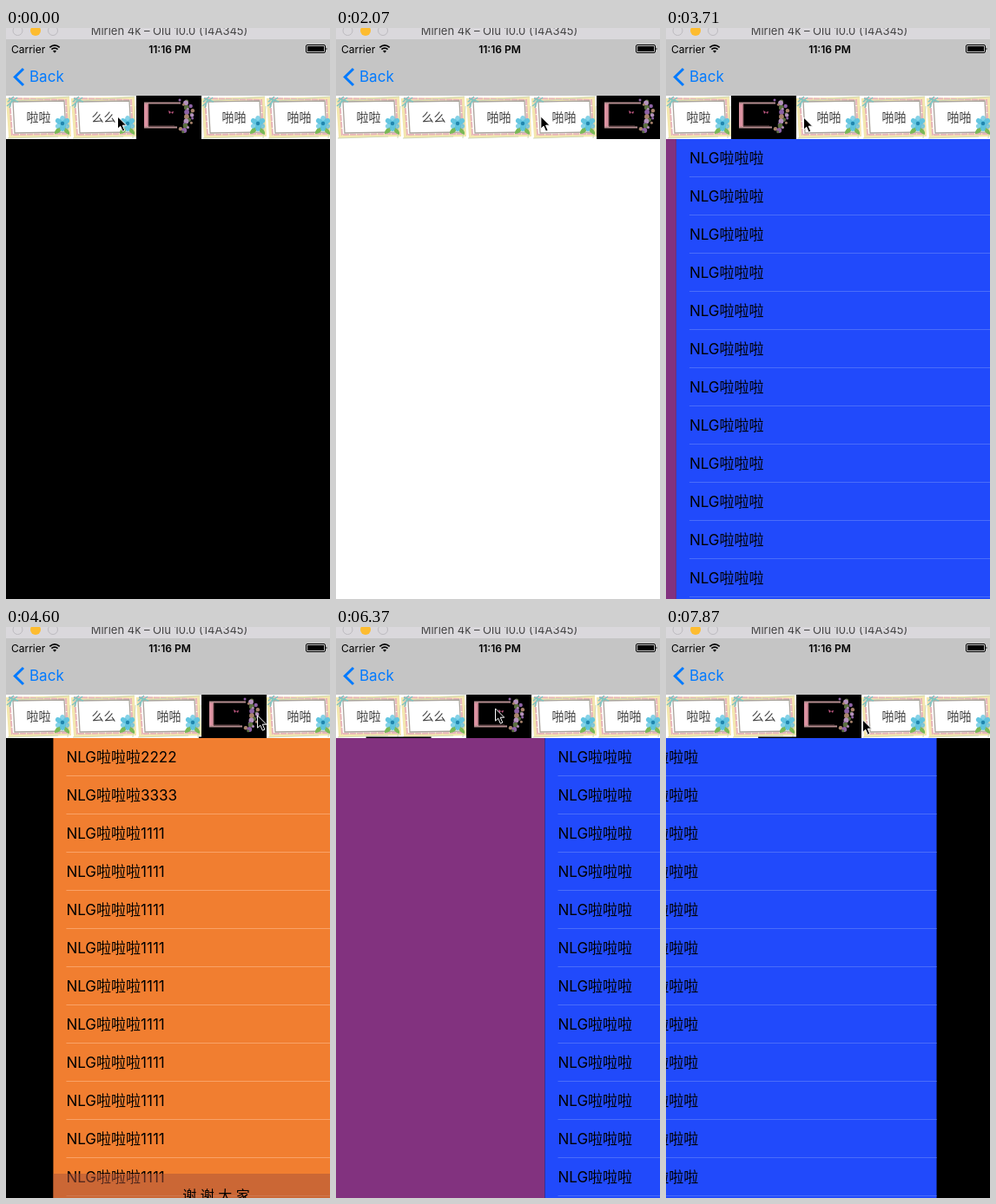
These frames come from a looping animation (373 by 658 pixels, 8 s). An HTML page:

```html
<!DOCTYPE html>
<html lang="zh">
<head>
<meta charset="utf-8">
<style>
  html, body { margin: 0; width: 100%; height: 100%; overflow: hidden; background: #000; }
  svg { display: block; width: 373px; height: 658px; font: 17px Inter, "Noto Sans CJK SC", "Noto Sans CJK", sans-serif; }
  .label { font-size: 14px; fill: #3c3c3c; text-anchor: middle; }
  .mid { text-anchor: middle; }
</style>
</head>
<body>
<svg viewBox="0 0 373 658">
  <defs>
    <g id="light">
      <rect width="75" height="50" fill="#fff"/>
      <g fill="none">
        <path d="M2 5 71 3 73 45 5 47Z" stroke="#f3e7ae" stroke-width="4"/>
        <path d="M4 3 69 5 71 44 7 45Z" stroke="#e8b4b9" stroke-width="2" stroke-dasharray="7 1"/>
        <path d="M1 7 73 1M74 12 71 49M2 49 60 47" stroke="#cfd8b4"/>
        <path d="M8 7 67 6 69 42 10 43Z" fill="#fff" stroke="#a9a39b" stroke-width="1.3"/>
        <path d="M1 12 13 2M2 7 9 1M3 3 14 7M4 14 7 4" stroke="#7fc4c0" stroke-width="1.5"/>
      </g>
      <path d="M65 36q-9 0-9 8q7 0 9-8q1 7 8 9q1-7-8-9" fill="#79b956"/>
      <g id="petals" fill="#5cc3df"></g>
      <circle cx="65" cy="32" r="2.2" fill="#2286ad"/>
    </g>
    <g id="dark">
      <rect width="75" height="50"/>
      <path d="M9 8h5v29H9z" fill="#dc93a2"/>
      <path d="M9 8.5h42M9 36.5h38" fill="none" stroke="#b58d90" stroke-width="2"/>
      <path d="M14 10v25h30" fill="none" stroke="#6b4a4c"/>
      <path d="M40 19l-3-2 1 4zl3-1-1 3z" fill="#c65a86"/>
      <g id="garland"></g>
    </g>
    <clipPath id="body"><path d="M0 128h373v530H0z"/></clipPath>
  </defs>

  <rect width="373" height="658"/>
  <g clip-path="url(#body)"><g id="pages"></g></g>

  <rect y="13" width="373" height="65" fill="#c5c5c5"/>
  <rect width="373" height="13" fill="#dad8dc"/>
  <g fill="none" stroke="#bdbbc0"><circle cx="13.5" cy="3" r="5.5"/><circle cx="54" cy="3" r="5.5"/></g>
  <circle cx="34" cy="3" r="6" fill="#fdbc30"/>
  <text class="mid" x="188" y="8" font-size="13" fill="#444">Mirlen 4k – Olu 10.0 (14A345)</text>
  <text x="6" y="28.5" font-size="12">Carrier</text>
  <g fill="none" stroke="#000" stroke-width="1.7">
    <path d="M50.3 22.3q5.7-5 11.4 0M52.4 24.7q3.6-3 7.2 0"/>
  </g>
  <path d="M54 26.5q2-1.5 4 0l-2 2.2z"/>
  <text class="mid" x="188.5" y="28.5" font-size="12" font-weight="600">11:16 PM</text>
  <rect x="345.5" y="19.5" width="22" height="9" rx="1.5" fill="none" stroke="#000"/>
  <path d="M347 21h19v6h-19zM368.5 22.5q2 1.5 0 3z"/>
  <path d="M20 47 10.3 56.5 20 66" fill="none" stroke="#007aff" stroke-width="3"/>
  <text x="27" y="62" fill="#007aff">Back</text>

  <g id="tabs"></g>
  <rect id="underline" y="126.5" width="75" height="1.5"/>
  <path id="cursor" d="M0 0v14.2l3.2-3 2.6 6 2.5-1.1-2.6-5.9h4.5z" stroke="#fff" stroke-width="1"/>
</svg>

<script>
const $ = id => document.getElementById(id);
const times = (n, make) => Array.from({ length: n }, (_, i) => make(i)).join("");
const PAGE = 375, TAB = 75, LOOP = 8000, STEP = 148, LAST_STEP = 53;

// [time, tab tapped]
const taps = [[-1000, 2], [430, 3], [1470, 4], [2040, 2], [2573, 1], [2990, 0], [3432, 1], [3870, 2],
  [4360, 3], [4880, 4], [5446, 1], [5850, 0], [6283, 2], [6800, 0], [7677, 2]];

// [time, x, y] of the pointer tip
const pointer = [[0, 128.5, 102], [250, 128.5, 102], [440, 256, 100], [888, 256, 100], [1332, 332, 98.5],
  [1700, 334, 100], [2040, 185, 103], [2200, 183, 103], [2573, 105, 103], [2812, 60.5, 102], [2990, 38, 102],
  [3200, 40, 102], [3432, 112, 103], [3700, 158.5, 103], [3870, 185, 103], [4360, 258, 102], [4880, 330, 102],
  [5150, 328, 102], [5446, 107, 105], [5600, 100, 105], [5850, 38, 102], [6050, 40, 102], [6283, 178, 95],
  [6364, 183.5, 94], [6500, 182, 95], [6800, 38, 102], [7380, 38, 102], [7677, 185, 105], [7844, 226.5, 107]];

$("petals").innerHTML = times(6, i =>
  `<ellipse cx="65" cy="27.5" rx="3" ry="4.5" transform="rotate(${i * 60} 65 32)" opacity="${0.75 + i % 2 * 0.2}"/>`);
$("garland").innerHTML = times(22, i => {
  const x = 54 + 8 * Math.sin(i * 0.16) - 4 * Math.cos(i * 2.3);
  const color = ["#8d62a5", "#5c7040", "#b491bd", "#a8836c"][i % 4];
  return `<circle cx="${x}" cy="${5 + i * 1.75}" r="${1.5 + i % 3 * 0.7}" fill="${color}"/>`;
});

const table = (page, fill, line, label) => `<g transform="translate(${page * PAGE})">
  <rect y="128" width="${PAGE}" height="530" fill="${fill}"/>` + times(12, i =>
  `<text x="15" y="${156 + i * 44}">${label(i)}</text>
  <rect x="15" y="${171 + i * 44}" width="360" height="1" fill="${line}"/>`) + "</g>";

$("pages").innerHTML =
  `<rect y="128" width="${PAGE}" height="530" fill="#82327f"/>` +
  table(1, "#214afb", "#4a6dfa", () => "NLG啦啦啦") +
  table(3, "#f17e30", "#f9a267", i => "NLG啦啦啦" + (["2222", "3333"][i] || "1111")) +
  `<g transform="translate(${3 * PAGE})"><rect y="630" width="${PAGE}" height="28" fill="#a5503a" opacity=".5"/>
  <text class="mid" x="187.5" y="661" font-size="16">谢 谢 大 家</text></g>
  <rect x="${4 * PAGE}" y="128" width="${PAGE}" height="530" fill="#fff"/>`;

$("tabs").innerHTML = ["啦啦", "么么", "啪啪", "啪啪", "啪啪"].map((label, i) =>
  `<g transform="translate(${i * TAB} 78)"><use href="#light"/>
  <text class="label" x="37.5" y="30">${label}</text><use class="chosen" href="#dark"/></g>`).join("");
const chosen = [...document.querySelectorAll(".chosen")];

const ease = x => x >= 1 ? 1 : x * x * (3 - 2 * x);

function pointerAt(t) {
  const next = pointer.findIndex(p => p[0] > t);
  if (next < 0) return pointer[pointer.length - 1].slice(1);
  const a = pointer[next - 1], b = pointer[next];
  const k = (t - a[0]) / (b[0] - a[0]);
  return [1, 2].map(j => a[j] + (b[j] - a[j]) * k);
}

function draw(now) {
  const t = Math.min(LAST_STEP, Math.floor(now % LOOP / STEP)) * STEP;
  const current = taps.filter(tap => tap[0] <= t).length - 1;
  const [start, to] = taps[current];
  const from = current ? taps[current - 1][1] : to;
  const slide = duration => from + (to - from) * ease((t - start) / duration);

  $("pages").setAttribute("transform", `translate(${-slide(300) * PAGE})`);
  $("underline").setAttribute("x", slide(260) * TAB);
  $("cursor").setAttribute("transform", `translate(${pointerAt(t)})`);
  chosen.forEach((tab, i) => tab.style.display = i === to ? "" : "none");
}

const begin = performance.now();
(function tick() {
  draw(performance.now() - begin);
  requestAnimationFrame(tick);
})();
</script>
</body>
</html>
```
